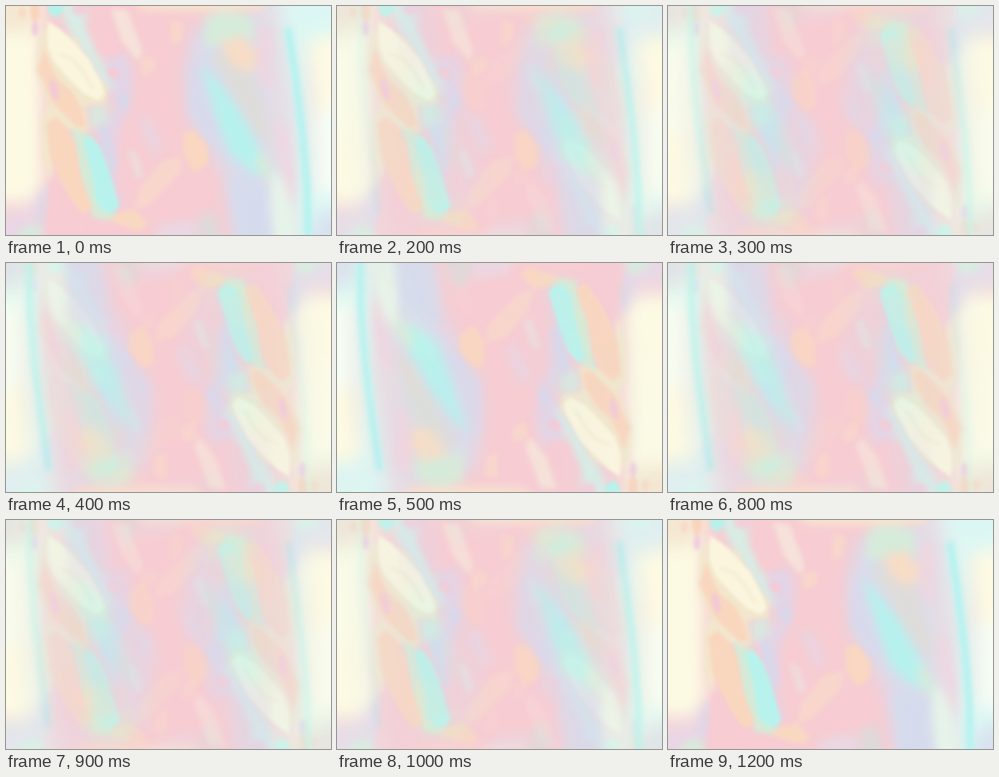
Write an HTML page that moves like this. It is 594 px wide and 420 px high and loops after 1300 ms.

```html
<!DOCTYPE html>
<html lang="en">
<head>
<meta charset="utf-8">
<title>Pastel crossfade</title>
<style>
  html, body { margin: 0; width: 100%; height: 100%; overflow: hidden; background: #f7cfd5; }
  svg { position: absolute; left: 0; top: 0; width: 594px; height: 420px; overflow: hidden; }
  .haze { filter: blur(16px); }
  .soft { filter: blur(9px); }
  .mid { filter: blur(5px); }
  .fine { filter: blur(3px); }
  .line { fill: none; stroke-linecap: round; stroke-linejoin: round; }

  /* the same painting, turned half round, fades in and out over the first */
  .turned {
    transform: rotate(180deg);
    will-change: opacity;
    animation: fade 1300ms step-end infinite;
  }
  @keyframes fade {
    0% { opacity: 0; }
    7.692% { opacity: .067; }
    15.385% { opacity: .25; }
    23.077% { opacity: .5; }
    30.769% { opacity: .75; }
    38.462% { opacity: .933; }
    46.154% { opacity: 1; }
    53.846% { opacity: .933; }
    61.538% { opacity: .75; }
    69.231% { opacity: .5; }
    76.923% { opacity: .25; }
    84.615% { opacity: .067; }
    92.308%, 100% { opacity: 0; }
  }
</style>
</head>
<body>
<svg viewBox="0 0 594 420">
  <g id="art">
    <rect width="594" height="420" fill="#f7cdd3"/>

    <g class="haze">
      <path fill="#fcfae3" d="M-60-60H70L66 120 70 350 40 362H-60Z"/>
      <path fill="#f5e8d2" d="M-60-60H60V45L20 50H-60Z"/>
      <path fill="#ead6e5" d="M-60 378H30L72 330V480H-60Z"/>
      <path fill="#d9dcec" d="M345 40 480 0 560 480H425L400 310 340 215 328 130Z"/>
      <path fill="#e6dde5" d="M455-40H530L540 480H505L480 250Z"/>
      <path fill="#dcf7f3" d="M490-60H660V70L550 60 560 340 660 350V480H520L530 200Z"/>
      <path fill="#fdfae3" d="M552 62 660 40V200L564 190Z"/>
      <path fill="#f5fef6" d="M562 190H660V345H566Z"/>
      <path fill="#d9e1ef" d="M562 385 660 365V480H555Z"/>
    </g>

    <g class="soft">
      <path fill="#d6ebda" d="M365 18 405 8 448 20 455 60 400 70 362 75Z"/>
      <path fill="#dedcda" d="M372 90 405 75 455 130 490 255 455 235 415 165Z"/>
      <path fill="#f7dcc6" d="M390 65 435 55 462 90 450 122 415 112Z"/>
      <path fill="#eed5df" d="M458 35 485 45 485 155 462 140Z"/>
      <path fill="#b6f1ed" d="M356 108 380 130 422 185 458 250 482 300 458 312 410 272 388 215Z"/>
      <path fill="#d5eadc" d="M462 252 490 300 486 330 455 295Z"/>
      <path fill="#d5dbec" d="M408 315 450 318 485 345 480 440H425Z"/>
      <path fill="#e2d4e6" d="M180 98 222 85 232 130 225 190 205 225 200 330 212 372 192 370 165 225 200 190Z"/>
      <path fill="#e8d5e2" d="M240 205 262 205 284 255 272 275Z"/>
      <path fill="#d7d9eb" d="M340 85 352 120 365 180 395 250 372 245 335 195Z"/>
      <path fill="#d6eee6" d="M85-20H140L148 45 190 135 194 162 175 150 120 55Z"/>
      <path fill="#d9e7df" d="M150 178 188 178 185 215 150 230Z"/>
      <path fill="#efd5e0" d="M490 210 512 225 526 300 528 370 512 330Z"/>
      <path fill="#e6f3e9" d="M488 300 510 325 526 380 530 440H492L482 360Z"/>
      <path fill="#ded9d9" d="M352 390 372 372 390 398 395 440H345Z"/>
      <path fill="#ead7e2" d="M280 402 345 390V440H270Z"/>
      <path fill="#d5ebda" d="M25 412 55 398 78 440H20Z"/>
      <path fill="#f8e5cd" d="M230-20H480L465 5 420 7 330 9 250 6Z"/>
      <path class="line" stroke="#d9d7e9" stroke-width="14" d="M72 340 65 390"/>
    </g>

    <g class="mid">
      <path fill="#f2e7cd" d="M58 60 75 40 130 60 150 110 186 150 182 180 145 182 150 230 100 225 80 320 65 270 66 205 78 180 54 120Z"/>
      <path fill="#f9d7c0" d="M325 232 345 228 370 260 368 290 345 305 325 275Z"/>
      <path fill="#f8d6cb" d="M300 25 325 30 320 65 302 75ZM245 100 270 92 275 115 250 130ZM285 285 320 275 318 305 260 365 235 372 245 335Z"/>
      <path fill="#f6e2da" d="M192 5 222 8 250 85 240 100 212 65Z"/>
      <path fill="#eedbdc" d="M222 262 238 268 252 310 238 318Z"/>
      <path fill="#f7ccd3" d="M152 32 182 25 205 65 202 90 172 88Z"/>
      <path fill="#f7ccd3" d="M80 318 100 312 125 345 148 385 135 440H70Z"/>
      <path fill="#d5ead6" d="M118 222 150 235 190 375 205 382 185 393 160 388 138 335Z"/>
      <path fill="#f9d8c0" d="M205 378 235 373 258 398 245 412 212 402 190 395Z"/>
      <path class="line" stroke="#b5f2ef" stroke-width="14" d="M516 45 529 130 542 235 550 330 553 440"/>
      <path class="line" stroke="#d6d8eb" stroke-width="14" d="M178 228 194 295M214 165 216 182"/>
      <ellipse cx="135" cy="3" rx="15" ry="14" fill="#f3ced9"/>
    </g>

    <g class="fine">
      <path fill="#fbf5de" d="M76 28 98 42 128 72 152 98 174 142 180 162 168 173 142 160 112 130 86 100 76 72Z"/>
      <path fill="#f9d6be" d="M70 78 80 105 95 135 122 158 140 190 147 222 130 223 105 198 82 174 70 142 58 118Z"/>
      <path fill="#f9d6be" d="M74 215 90 203 108 218 126 250 136 310 158 372 140 383 118 355 95 312 80 275Z"/>
      <path fill="#b8f2ec" d="M140 245 154 237 172 258 188 300 207 366 199 378 180 379 165 360 156 305Z"/>
      <path fill="#b6f1ea" d="M75-10H108L102 12 88 22 78 12Z"/>
      <path fill="#f9d3bd" d="M44-10H62L61 20 53 32 45 20Z"/>
      <ellipse cx="30" cy="12" rx="7" ry="11" fill="#f8dac5"/>
      <ellipse cx="53" cy="41" rx="6" ry="14" fill="#efcddd"/>
      <ellipse cx="88" cy="153" rx="7" ry="20" fill="#f2cad5" transform="rotate(-12 88 153)"/>
      <ellipse cx="196" cy="123" rx="12" ry="9" fill="#f5cad6" transform="rotate(35 196 123)"/>
      <path class="line" stroke="#f5ebd0" stroke-width="5" d="M98 88 122 98 142 122 158 150"/>
    </g>
  </g>
</svg>
<svg class="turned" viewBox="0 0 594 420"><use href="#art"/></svg>
</body>
</html>
```
